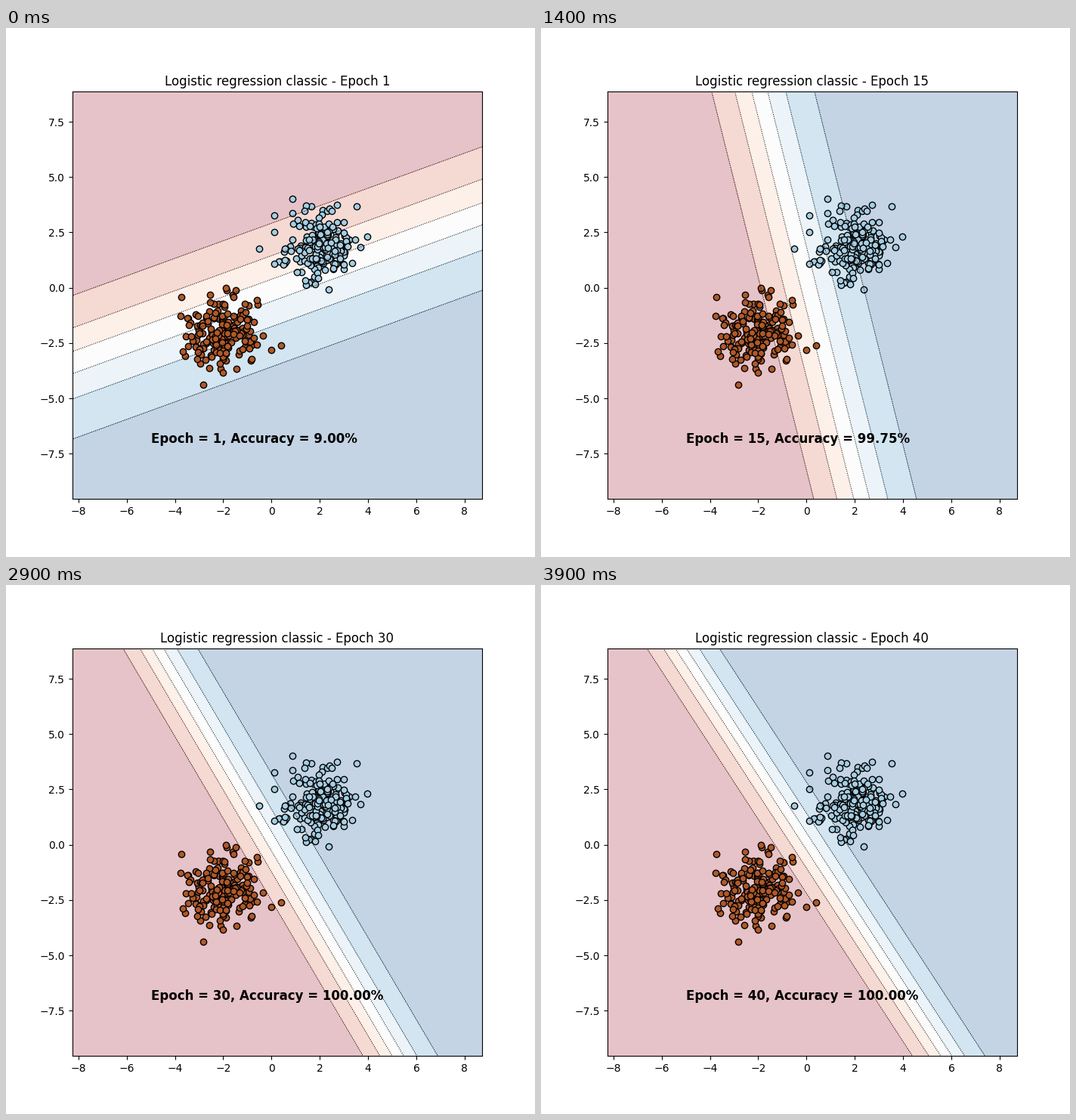
Write a matplotlib script that moves like this. It is 700 by 700 pixels and loops after 4 s.

```python
import math

import matplotlib.pyplot as plt
import numpy as np
from matplotlib.animation import FuncAnimation

EPOCHS = 40
SAMPLES = 200
CENTER = 2
SIGMA = 0.836
XLIM = (-8.26, 8.725)
YLIM = (-9.54, 8.866)

# Weights on x and y at a few key epochs of the training
KEYS = np.array([1, 10, 15, 20, 25, 34, 40])
WEIGHTS = np.array([(0.240, -0.606), (0.675, -0.0953), (0.923, 0.212),
                    (1.106, 0.441), (1.2075, 0.589), (1.298, 0.737),
                    (1.309, 0.782)])
RATES = np.gradient(WEIGHTS, KEYS, axis=0, edge_order=2)

# The outermost points that give each cluster its outline
BLUE_RIM = [(-0.5, 1.77), (0.1, 3.28), (0.1, 1.08), (0.86, 4.03),
            (3.54, 3.69), (3.97, 2.3), (2.36, -0.08)]
RED_RIM = [(-3.74, -0.43), (-3.66, -2.87), (-2.82, -4.37), (0.39, -2.6),
           (0, -2.8), (-1.9, 0), (-0.6, -0.55)]

rng = np.random.default_rng(7)


def cluster(center, rim):
    """Gaussian cloud without far outliers, plus its rim points."""
    cloud = rng.normal(0, SIGMA, (2 * SAMPLES, 2))
    cloud = cloud[np.hypot(*cloud.T) < 2][:SAMPLES - len(rim)]
    return np.vstack((cloud + center, rim))


def weights_at(epoch):
    """Cubic Hermite curve through the key epochs."""
    i = min(np.searchsorted(KEYS, epoch, side="right") - 1, len(KEYS) - 2)
    h = KEYS[i + 1] - KEYS[i]
    t = (epoch - KEYS[i]) / h
    return ((1 + 2 * t) * (1 - t) ** 2 * WEIGHTS[i]
            + t * (1 - t) ** 2 * h * RATES[i]
            + t * t * (3 - 2 * t) * WEIGHTS[i + 1]
            + t * t * (t - 1) * h * RATES[i + 1])


def accuracy(w1, w2):
    """Share of the two Gaussian clusters on the correct side, in percent."""
    margin = CENTER * (w1 + w2) / (SIGMA * math.hypot(w1, w2))
    share = 0.5 * (1 + math.erf(margin / math.sqrt(2)))
    return 100 * round(share * 2 * SAMPLES) / (2 * SAMPLES)


# Probability bands of width 0.15, expressed as logits
probs = np.arange(1, 7) * 0.15
logits = np.log(probs / (1 - probs))
edges = np.concatenate(([-99], logits, [99]))
bands = plt.cm.RdBu((np.arange(7) + 0.5) / 7)

fig, ax = plt.subplots(figsize=(7, 7), dpi=100)
ax.set_xlim(XLIM)
ax.set_ylim(YLIM)

for center, rim, color in ((-CENTER, RED_RIM, plt.cm.Paired(11)),
                           (CENTER, BLUE_RIM, plt.cm.Paired(0))):
    ax.scatter(*cluster(center, rim).T, color=[color], edgecolors="k",
               linewidths=1, zorder=1)

title = ax.set_title("")
label = ax.text(-5, -7, "", fontsize=12, fontweight="bold")
grid_x, grid_y = np.meshgrid(XLIM, YLIM)
contours = []


def draw(frame):
    epoch = frame + 1
    w1, w2 = weights_at(epoch)
    bias = 0.03 - 0.046 * frame / (EPOCHS - 1)
    field = w1 * grid_x + w2 * grid_y + bias

    while contours:
        contours.pop().remove()
    contours.append(ax.contourf(grid_x, grid_y, field, levels=edges,
                                colors=bands, alpha=0.25, zorder=0.5))
    contours.append(ax.contour(grid_x, grid_y, field, levels=logits,
                               colors="k", linestyles="dotted",
                               linewidths=0.7))

    title.set_text(f"Logistic regression classic - Epoch {epoch}")
    label.set_text(f"Epoch = {epoch}, Accuracy = {accuracy(w1, w2):.2f}%")
    return [title, label]


anim = FuncAnimation(fig, draw, frames=EPOCHS, interval=100, repeat=True,
                     repeat_delay=0, init_func=lambda: draw(0))
plt.show()
```
